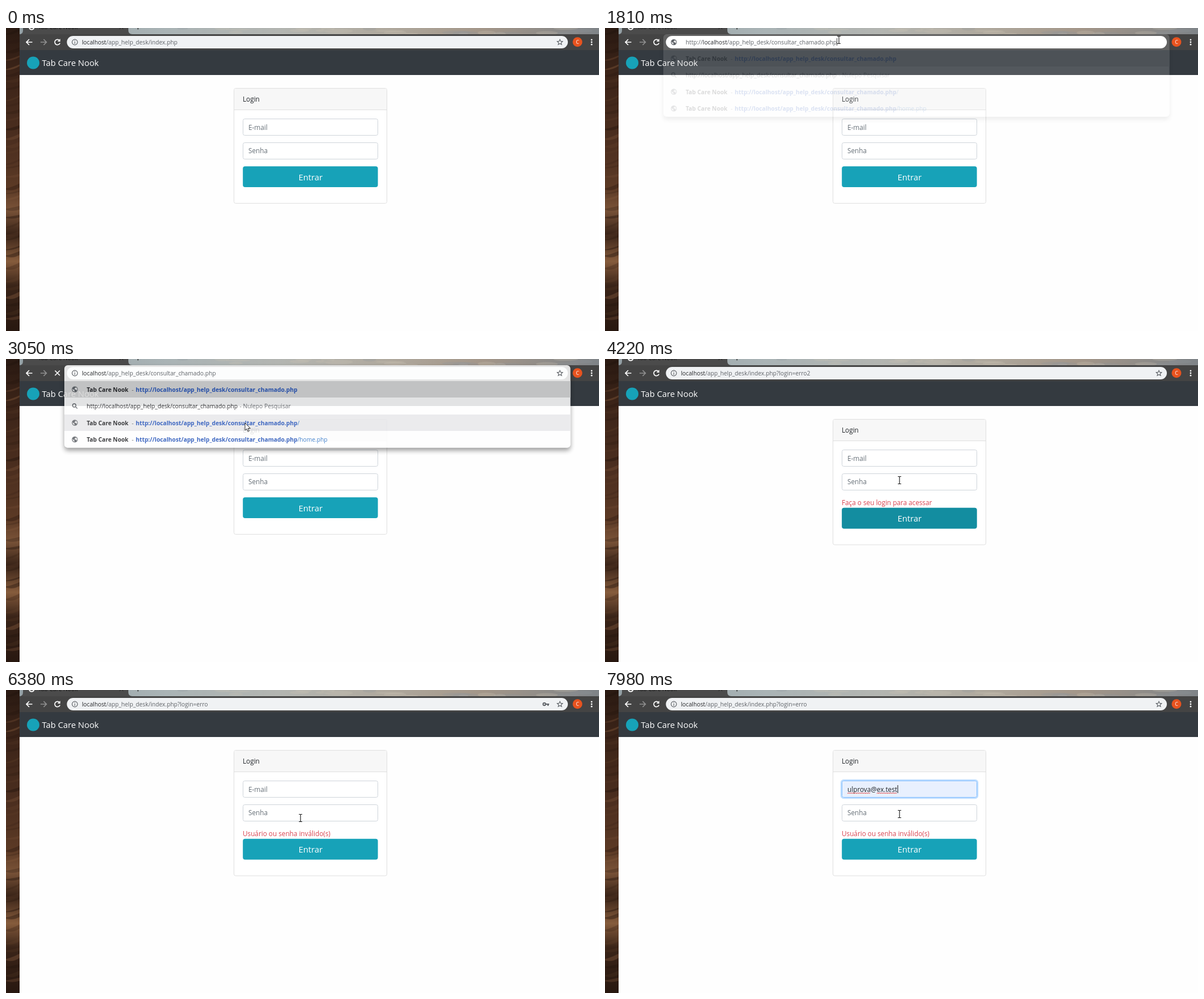
These frames come from a looping animation (1047 px wide and 535 px high, 8 s). An HTML page:

```html
<!DOCTYPE html>
<html lang="pt-BR">
<head>
<meta charset="utf-8">
<title>Login</title>
<style>
html, body { margin: 0; width: 100%; height: 100%; overflow: hidden; background: #fefefe; }
svg { display: block; width: 100vw; height: 100vh; }
text { font-family: "Open Sans", "Noto Sans", sans-serif; white-space: pre; }
.body { font-size: 11.75px; fill: #212529; }
.hint { fill: #666f77; }
.bar { font-size: 10.25px; fill: #5f6368; }
.bold { font-weight: 700; fill: #202124; }
.link { fill: #2a72c8; }
.link .b { font-weight: 700; fill: #2050b8; }
.input { fill: #fff; stroke: #ced4da; }
</style>
</head>
<body>
<svg viewBox="0 0 1047 535" preserveAspectRatio="none">
  <defs>
    <linearGradient id="sky">
      <stop offset="0" stop-color="#94a1a6"/><stop offset=".25" stop-color="#a9b3b5"/>
      <stop offset=".45" stop-color="#b3b5b1"/><stop offset=".62" stop-color="#b0aa9f"/>
      <stop offset=".8" stop-color="#a39689"/><stop offset="1" stop-color="#7f8488"/>
    </linearGradient>
    <linearGradient id="rock" x2="0" y2="1">
      <stop offset="0" stop-color="#2a1a12"/><stop offset=".15" stop-color="#3c2418"/>
      <stop offset=".4" stop-color="#4e3020"/><stop offset=".53" stop-color="#5c3a25"/>
      <stop offset=".6" stop-color="#7a5338"/><stop offset=".68" stop-color="#3a2418"/>
      <stop offset=".77" stop-color="#865c3c"/><stop offset=".85" stop-color="#3a2418"/>
      <stop offset="1" stop-color="#281810"/>
    </linearGradient>
    <filter id="shade" x="-5%" y="-15%" width="110%" height="140%">
      <feDropShadow dx="0" dy="5" stdDeviation="4" flood-opacity=".45"/>
    </filter>
    <clipPath id="panel"><rect x="103" y="11" width="893.500" height="145.500" rx="6"/></clipPath>
    <g id="globe">
      <circle r="5.200" fill="#5f6368"/>
      <path d="M-4-1L-.6 2V4.100Q-4 3.400-4-1ZM-1-3.900L1.300-3.800V-2.400L-.4-1.200V.2H2.300L3.300 2.400Q4.500.9 4.100-1.200L2.400-3.300Z" fill="#eee"/>
    </g>
  </defs>

  <rect width="1047" height="535" fill="#fefefe"/>
  <rect width="24" height="535" fill="url(#rock)"/>
  <g id="rocks"></g>
  <rect x="24" width="1023" height="12" fill="url(#sky)"/>
  <g id="clouds"></g>
  <path d="M24 11Q30 11 30 4V0H216V4Q216 11 223 11Z" fill="#4b4b4b"/>
  <rect x="24" y="11" width="1023" height="28" fill="#444"/>
  <path id="favicon" d="M41-1A4.300 4.300 0 0 0 49.500-1" fill="none" stroke="#f4f4f4" stroke-width="2"/>
  <text x="57" y="1.500" font-size="10.250" fill="#191919">Tab Care Nook</text>
  <path d="M200.500-5L207 2M207-5L200.500 2" stroke="#222"/>
  <path d="M233-5V2.500M229-1H237" stroke="#333" stroke-width="1.500"/>

  <rect x="24" y="39" width="1023" height="44" fill="#343a40"/>
  <circle cx="48" cy="61.500" r="11" fill="#17a2b8"/>
  <text x="63.500" y="67.300" font-size="14.800" fill="#fff">Tab Care Nook</text>

  <rect id="card" x="402.500" y="106.500" width="270" rx="3" fill="#fff" stroke="#dfdfdf"/>
  <path d="M403 144V109Q403 107 405 107H670Q672 107 672 109V144Z" fill="#f7f7f7"/>
  <path d="M403 144.500H672" stroke="#dfdfdf"/>
  <text class="body" x="418" y="130">Login</text>
  <g id="mailRing"><rect x="417" y="159" width="241" height="32" rx="4.500" fill="none" stroke="#bfdeff" stroke-width="2.500"/></g>
  <rect id="mail" class="input" x="418.500" y="160.500" width="238" height="29" rx="3"/>
  <text id="mailHint" class="body hint" x="428" y="179.500">E-mail</text>
  <text id="mailText" class="body" x="428" y="179.500">ulprova@ex.test</text>
  <path id="wave" fill="none" stroke="#e53935" stroke-width="1"/>
  <g id="passRing"><rect x="417" y="201" width="241" height="32" rx="4.500" fill="none" stroke="#bfdeff" stroke-width="2.500"/></g>
  <rect id="pass" class="input" x="418.500" y="202.500" width="238" height="29" rx="3"/>
  <text id="passHint" class="body hint" x="428" y="221.300">Senha</text>
  <circle id="dot" cx="431" cy="217.500" r="2.300" fill="#333"/>
  <rect id="caret" width="1" height="14" fill="#111"/>
  <text id="error" class="body" x="418" y="258" style="fill:#d9434f"></text>
  <g id="button">
    <rect x="418.200" y="244.200" width="238.400" height="36.800" rx="4" fill="#17a2b8"/>
    <rect id="hover" x="418.200" y="244.200" width="238.400" height="36.800" rx="4" fill="#117a8b"/>
    <text x="537.700" y="268.500" font-size="14.800" fill="#fff" text-anchor="middle">Entrar</text>
  </g>
  <g id="popup">
    <rect x="418.500" y="192.500" width="238" height="62" rx="2" fill="#fff" stroke="#c8c8c8"/>
    <rect id="pick" x="419" y="198" width="237" height="25" fill="#e8e8e9"/>
    <text class="body" x="428" y="214.500">ulprova@ex.test</text>
    <text class="body" x="428" y="239.500">gerprova@ex.test</text>
  </g>

  <g fill="none" stroke="#fff" stroke-width="1.700">
    <path d="M46.500 25H36.500M41 20L36 25 41 30"/>
    <path d="M61 25H71M66.500 20L71.500 25 66.500 30" stroke="#909090"/>
    <g id="reload"><path d="M94 21.500A4.700 4.700 0 1 0 95.300 26.500"/><path d="M95.800 19V24H91Z" fill="#fff" stroke="none"/></g>
    <path id="stop" d="M86.500 20.500L95 29M95 20.500L86.500 29"/>
  </g>
  <rect id="pill" x="107.500" y="14" width="884.500" height="22" rx="11"/>

  <g id="drop">
    <rect x="103" y="11" width="893.500" height="145.500" rx="6" fill="#fff" filter="url(#shade)"/>
    <g clip-path="url(#panel)">
      <rect x="103" y="39" width="894" height="29" fill="#d9d9d9"/>
      <rect id="row" x="103" y="98" width="894" height="29" fill="#e8e8eb"/>
    </g>
    <g id="rows"></g>
    <g fill="none" stroke="#5f6368" stroke-width="1.300"><circle cx="120.500" cy="82" r="3"/><path d="M122.700 84.200L126 87.500"/></g>
    <text class="bar" x="142.500" y="87" style="fill:#202124">http://localhost/app_help_desk/consultar_chamado.php</text>
    <text class="bar" x="412.500" y="87">- Nulepo Pesquisar</text>
  </g>

  <rect id="select" x="133" y="17.500" height="15" fill="#0078d7"/>
  <text id="url" class="bar" y="28.700"><tspan id="scheme"></tspan><tspan id="host">localhost</tspan><tspan id="path"></tspan></text>
  <rect id="urlCaret" y="18" width="1" height="13" fill="#444"/>
  <g id="info"><circle cx="121.500" cy="25" r="4.800" fill="none" stroke="#5f6368" stroke-width="1.200"/><path d="M121.500 24.500V28M121.500 22V23.300" stroke="#5f6368" stroke-width="1.200"/></g>
  <use id="edit" href="#globe" x="121.500" y="25"/>
  <path id="star" d="M978 20.200L979.400 23.400 982.800 23.700 980.200 26 981 29.300 978 27.500 975 29.300 975.800 26 973.200 23.700 976.600 23.400Z" fill="none" stroke="#5f6368" stroke-width="1.100"/>
  <g id="key" fill="none" stroke="#5f6368"><circle cx="950.500" cy="25" r="2.200" stroke-width="2"/><path d="M953 25H959M957 25V28" stroke-width="2.200"/></g>
  <circle cx="1009" cy="24.700" r="8.500" fill="#e8531f"/>
  <text x="1009" y="28" font-size="9" fill="#fff" text-anchor="middle">C</text>
  <g fill="#fff"><circle cx="1034" cy="20.800" r="1.400"/><circle cx="1034" cy="25" r="1.400"/><circle cx="1034" cy="29.200" r="1.400"/></g>

  <g id="cursor">
    <path id="arrow" d="M0 0V13L3 10.300 5.200 15 7.300 14 5.200 9.500H9.400Z" fill="#fff" stroke="#111" stroke-width=".9"/>
    <path id="beam" d="M-3-6.500H-1Q0-6.500 0-5.500Q0-6.500 1-6.500H3M0-5.500V5.500M-3 6.500H-1Q0 6.500 0 5.500Q0 6.500 1 6.500H3" fill="none" stroke="#222" stroke-width="1.200"/>
  </g>
</svg>
<script>
const LOOP = 8000;
const $ = id => document.getElementById(id);
const show = (id, on) => $(id).setAttribute("visibility", on ? "visible" : "hidden");
const set = (id, attrs) => { for (const k in attrs) $(id).setAttribute(k, attrs[k]); };
const within = (t, a, b) => t >= a && t < b;
const ramp = (t, a, b) => Math.min(1, Math.max(0, (t - a) / (b - a)));
const pulse = (t, a, b, c, d) => ramp(t, a, b) * (1 - ramp(t, c, d));

let seed = 7;
const rand = () => (seed = (seed * 16807) % 2147483647) / 2147483647;

function scenery() {
  let rocks = "", clouds = "";
  const tones = ["#1d110b", "#62402a", "#8a5e40", "#2a1910"];
  for (let i = 0; i < 40; i++) {
    const y = i * 14 + rand() * 8, rise = 4 + rand() * 7, h = 2 + rand() * 5;
    const tone = tones[Math.floor(rand() * 4)];
    rocks += `<path d="M-2 ${y + rise}Q10 ${y + rise * 0.8} 26 ${y}V${y + h}Q12 ${y + rise + h}-2 ${y + rise + 1}Z" fill="${tone}" opacity="${0.15 + rand() * 0.25}"/>`;
  }
  for (let i = 0; i < 24; i++) {
    const tone = i % 3 ? "#cbc2b4" : "#8b949a";
    clouds += `<ellipse cx="${250 + rand() * 770}" cy="${rand() * 11}" rx="${8 + rand() * 18}" ry="${1.5 + rand() * 2.5}" fill="${tone}" opacity=".25"/>`;
  }
  $("rocks").innerHTML = `<svg width="24" height="535">${rocks}</svg>`;
  $("clouds").innerHTML = `<svg width="1047" height="11">${clouds}</svg>`;
}

function suggestions() {
  const base = "http://localhost/app_help_desk/consultar_chamado.php";
  $("rows").innerHTML = [[53.5, ""], [112.5, "/"], [142, "/home.php"]].map(([y, tail]) =>
    `<use href="#globe" x="121.500" y="${y}"/>
     <text class="bar bold" x="142.500" y="${y + 4}">Tab Care Nook</text>
     <text class="bar" x="222" y="${y + 4}">-</text>
     <text class="bar link" x="229" y="${y + 4}"><tspan class="b">${base}</tspan>${tail}</text>`).join("");
}

// time, x, y
const track = [
  [240, 945, 542], [410, 603, 170], [570, 603, 170], [900, 413, 21], [2170, 413, 21],
  [2250, 415, 105], [2440, 422, 113], [3590, 422, 113], [3850, 530, 272], [4110, 523, 265],
  [4220, 520, 214], [4370, 520, 178], [4800, 520, 178], [5190, 520, 219], [5370, 520, 219],
  [5660, 520, 226], [6690, 520, 226], [6900, 524, 231], [7170, 521, 177], [7380, 521, 177],
  [7600, 520, 219], [LOOP, 520, 219]
];

function pointer(t) {
  if (t <= track[0][0]) return track[0].slice(1);
  const i = track.findIndex(p => p[0] > t);
  const [a, x0, y0] = track[i - 1], [b, x1, y1] = track[i];
  const k = ramp(t, a, b), e = k * k * (3 - 2 * k);
  return [x0 + (x1 - x0) * e, y0 + (y1 - y0) * e];
}

function drawUrl(t) {
  const typed = within(t, 1770, 2950), marked = within(t, 1000, 1770);
  const file = t < 1770 ? "index.php" : t < 3110 ? "consultar_chamado.php"
    : t < 6360 ? "index.php?login=erro2" : "index.php?login=erro";
  const x = typed ? 142.5 : 134;
  $("scheme").textContent = typed ? "http://" : "";
  $("path").textContent = "/app_help_desk/" + file;
  $("url").style.fill = marked ? "#fff" : "";
  set("host", { fill: marked ? "#fff" : "#26282b" });
  set("url", { x });
  const width = $("url").getComputedTextLength();
  set("select", { width: width + 2 });
  set("urlCaret", { x: Math.floor(x + width) });
  set("pill", { fill: within(t, 1000, 2950) ? "#fff" : "#f0f2f4" });
  show("select", marked);
  show("urlCaret", typed);
  show("edit", typed);
  show("info", !typed);
  show("star", !typed);
  show("key", within(t, 6065, 7900));
  const loading = within(t, 2950, 3115) || within(t, 6330, 6365);
  show("stop", loading);
  show("reload", !loading);
  show("favicon", !loading);
  set("drop", { opacity: pulse(t, 1782, 1970, 3038, 3130) });
  show("row", t >= 2300);
}

function squiggle() {
  const text = $("mailText");
  const line = (from, count) => {
    const a = 428 + (from ? text.getSubStringLength(0, from) : 0);
    const b = a + text.getSubStringLength(from, count);
    let d = "";
    for (let x = a, up = 0; x <= b; x += 1.6, up ^= 1) d += (d ? "L" : "M") + x + " " + (183 - up * 1.7);
    return d;
  };
  return line(0, 7) + line(8, 7);
}

function drawForm(t) {
  const failed = t >= 3110, drop = failed ? 18.5 : 0;
  set("card", { height: 203 + drop });
  set("button", { transform: `translate(0 ${drop})` });
  set("hover", { opacity: pulse(t, 3800, 3950, 4150, 4300) });
  $("error").textContent = !failed ? "" : t < 6360 ? "Faça o seu login para acessar" : "Usuário ou senha inválido(s)";

  const open = t < 6360;
  const mailFocus = open ? pulse(t, 4420, 4570, 5480, 5630) : ramp(t, 7350, 7500);
  const passFocus = open ? ramp(t, 5480, 5630) : 0;
  const filled = within(t, 5100, 6360) || t >= 7560;
  const settled = within(t, 5370, 6360) || t >= 7820;
  const typedPass = within(t, 6050, 6360);
  const edge = f => f > 0.5 ? "#80bdff" : "#ced4da";
  set("mailRing", { opacity: mailFocus });
  set("passRing", { opacity: passFocus });
  set("mail", { style: `stroke:${edge(mailFocus)};fill:${filled ? "#e8f0fe" : "#fff"}` });
  set("pass", { style: `stroke:${edge(passFocus)}` });
  show("mailHint", !filled);
  show("mailText", filled);
  show("wave", settled);
  if (settled) set("wave", { d: squiggle() });
  show("passHint", !typedPass);
  show("dot", typedPass);

  const end = settled ? $("mailText").getComputedTextLength() + 0.5 : 0;
  show("caret", mailFocus > 0.1 || passFocus > 0.1);
  set("caret", passFocus > 0.1 ? { x: typedPass ? 435 : 428, y: 210 } : { x: 428 + end, y: 168 });

  const popup = pulse(t, 4600, 4680, 5370, 5420) + pulse(t, 7400, 7460, 7820, 7880);
  set("popup", { opacity: popup });
  show("pick", within(t, 5050, 5420) || t >= 7530);
  return popup > 0;
}

function draw(t) {
  drawUrl(t);
  const popup = drawForm(t);
  const [x, y] = pointer(t);
  const inField = x > 418 && x < 657 && (within(y, 160, 190) || (within(y, 202, 232) && !popup));
  const covered = within(t, 2000, 3590);
  const beam = y < 39 || (inField && !covered);
  set("cursor", { transform: `translate(${x} ${y})` });
  show("beam", beam);
  show("arrow", !beam);
}

scenery();
suggestions();
const start = performance.now();
function tick() {
  draw((performance.now() - start) % LOOP);
  requestAnimationFrame(tick);
}
tick();
</script>
</body>
</html>
```
